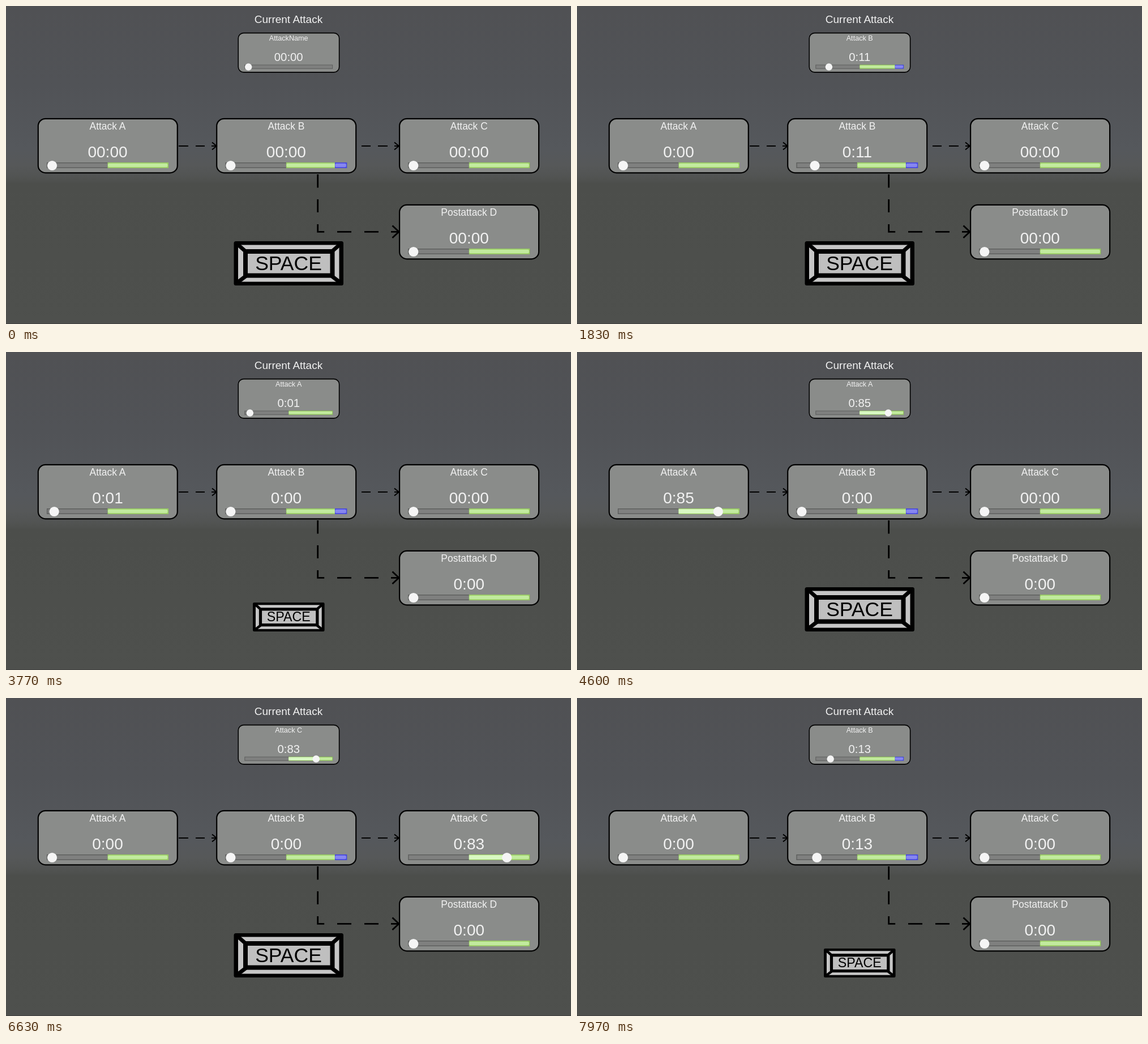
These frames come from a looping animation (998x561 px, 8 s). An HTML page:

```html
<!DOCTYPE html>
<html lang="en">
<head>
<meta charset="utf-8">
<title>Attack chain</title>
<style>
  html, body { margin: 0; width: 100%; height: 100%; overflow: hidden; background: #4e504d; }
  svg { display: block; width: 100vw; height: 100vh; }
  text { font-family: "Liberation Sans", Arial, sans-serif; text-anchor: middle; fill: #f2f2f2; }
  .link { fill: none; stroke: #000; }
</style>
</head>
<body>
<svg id="stage" viewBox="0 0 998 561" preserveAspectRatio="none">
  <defs>
    <linearGradient id="sky" x1="0" y1="0" x2="0" y2="1">
      <stop offset="0" stop-color="#505154"/>
      <stop offset=".25" stop-color="#515357"/>
      <stop offset=".45" stop-color="#55585c"/>
      <stop offset=".5" stop-color="#565859"/>
      <stop offset=".535" stop-color="#525453"/>
      <stop offset=".56" stop-color="#4c4e4b"/>
      <stop offset="1" stop-color="#4e504d"/>
    </linearGradient>
  </defs>
  <rect width="998" height="561" fill="url(#sky)"/>
  <rect y="560" width="998" height="1" fill="#414240"/>
  <text x="499" y="30" font-size="19">Current Attack</text>
  <g id="cards"></g>
  <g class="link" stroke-width="2">
    <path d="M305 247h17M335 247h16M363 247h9M364 240.5l8 6.5l-8 6.5"/>
    <path d="M628 247h16M657 247h17M686 247h8M686 240.5l8 6.5l-8 6.5"/>
  </g>
  <path class="link" stroke-width="2.8" d="M550.7 297v23.5M550.7 341v23M550.7 385v13.3h11.5M585 398.3h25M633 398.3h25M680 398.3h14M682.5 387.5l11.5 10.8l-11.5 10.8"/>
  <g id="key">
    <rect x="-97" y="-78" width="193.5" height="78" rx="3.5"/>
    <rect x="-89.5" y="-71.5" width="178.5" height="65" fill="#c6c6c6"/>
    <path d="M-91 -73L-74 -58M91 -73L74 -58M-91 -5L-74 -18M91 -5L74 -18" stroke="#000" stroke-width="7"/>
    <rect x="-76.5" y="-60" width="153.5" height="42.5" fill="#bfbfbf" stroke="#000" stroke-width="8"/>
    <text x="-.5" y="-27" font-size="35.5" style="fill:#000">SPACE</text>
  </g>
</svg>
<script>
const LOOP = 8000, RATE = 0.03;
const NAMES = { A: "Attack A", B: "Attack B", C: "Attack C", D: "Postattack D" };
const ORDER = "ABDABCAB";
const STARTS = [699, 1716, 2732, 3748, 4772, 5796, 6813, 7830];
const PRESSES = [700, 1530, 2640, 3640, 4650, 5600, 6680, 7860];
const HOLD = 150;
const BAR = { x: 16, y: 78, w: 215, h: 10 };
const KNOB = { x: 25.5, y: 83.5, travel: 197 };

const cardLayer = document.getElementById("cards");
const key = document.getElementById("key");

function add(parent, tag, attrs, label) {
  const el = document.createElementNS("http://www.w3.org/2000/svg", tag);
  for (const name in attrs) el.setAttribute(name, attrs[name]);
  if (label) el.textContent = label;
  parent.appendChild(el);
  return el;
}

function addZone(parent, from, to, edge, fill) {
  const x = BAR.x + BAR.w * from, w = BAR.w * (to - from);
  const g = add(parent, "g", {});
  add(g, "rect", { x, y: BAR.y, width: w, height: BAR.h, fill: edge });
  const inner = add(g, "rect", { x: x + 0.5, y: BAR.y + 1.7, width: w - 2, height: BAR.h - 3.4, rx: 2, fill });
  return { g, inner };
}

function makeCard(x, y, scale, name) {
  const g = add(cardLayer, "g", { transform: `translate(${x} ${y}) scale(${scale})` });
  add(g, "rect", { x: 0.8, y: 0.8, width: 246, height: 95.6, rx: 13, fill: "#8a8c8a", stroke: "#000", "stroke-width": 2.2 });
  const title = add(g, "text", { x: 123.5, y: 19.5, "font-size": 17.45 }, name);
  const time = add(g, "text", { x: 123.5, y: 69.3, "font-size": 28 });
  add(g, "rect", { x: BAR.x + 0.7, y: BAR.y + 0.7, width: BAR.w - 1.4, height: BAR.h - 1.4, fill: "#7f807f", stroke: "#5d5e5d", "stroke-width": 1.4 });
  const green = addZone(g, 0.5, 1, "#98cb62", "#c2eb9e").g;
  const glow = add(g, "rect", { x: BAR.x + BAR.w / 2, y: BAR.y + 1.2, height: BAR.h - 2.4, fill: "#d9f9c3" });
  const blue = addZone(g, 0.9, 1, "#4848df", "#8686f0").g;
  const knob = add(g, "circle", { cy: KNOB.y, r: 8.6, fill: "#f5f5f5" });
  return { title, time, green, glow, blue, knob };
}

function show(el, on) {
  el.setAttribute("display", on ? "inline" : "none");
}

function setCard(card, id, progress, label) {
  const x = KNOB.x + KNOB.travel * progress;
  card.time.textContent = label;
  card.knob.setAttribute("cx", x);
  card.glow.setAttribute("width", Math.max(0, x - BAR.x - BAR.w / 2));
  show(card.green, id);
  show(card.blue, id === "B");
}

const current = makeCard(409.7, 47, 0.725, "AttackName");
const cards = {
  A: makeCard(56, 198, 1, NAMES.A),
  B: makeCard(371.4, 198, 1, NAMES.B),
  C: makeCard(694.3, 198, 1, NAMES.C),
  D: makeCard(694.3, 350, 1, NAMES.D)
};

function clock(seconds) {
  const cs = Math.floor(seconds * 100);
  return Math.floor(cs / 100) + ":" + String(cs % 100).padStart(2, "0");
}

function draw(ms) {
  // the picture advances at 30 steps per second
  const t = Math.floor((ms + 5) * RATE) / RATE;
  const step = STARTS.filter(s => s <= t).length - 1;
  const active = step < 0 ? "" : ORDER[step];
  const progress = active ? Math.min(1, (t - STARTS[step]) / 1000) : 0;
  const label = active ? clock(progress) : "00:00";
  const used = ORDER.slice(0, step + 1);

  current.title.textContent = active ? NAMES[active] : "AttackName";
  setCard(current, active, progress, label);
  for (const id in cards) {
    if (id === active) setCard(cards[id], id, progress, label);
    else setCard(cards[id], id, 0, used.includes(id) ? "0:00" : "00:00");
  }

  const pressed = PRESSES.some(p => t >= p && t < p + HOLD);
  key.setAttribute("transform", `translate(499.5 493) scale(${pressed ? 0.654 : 1})`);
}

function tick() {
  draw(performance.now() % LOOP);
  requestAnimationFrame(tick);
}
tick();
</script>
</body>
</html>
```
